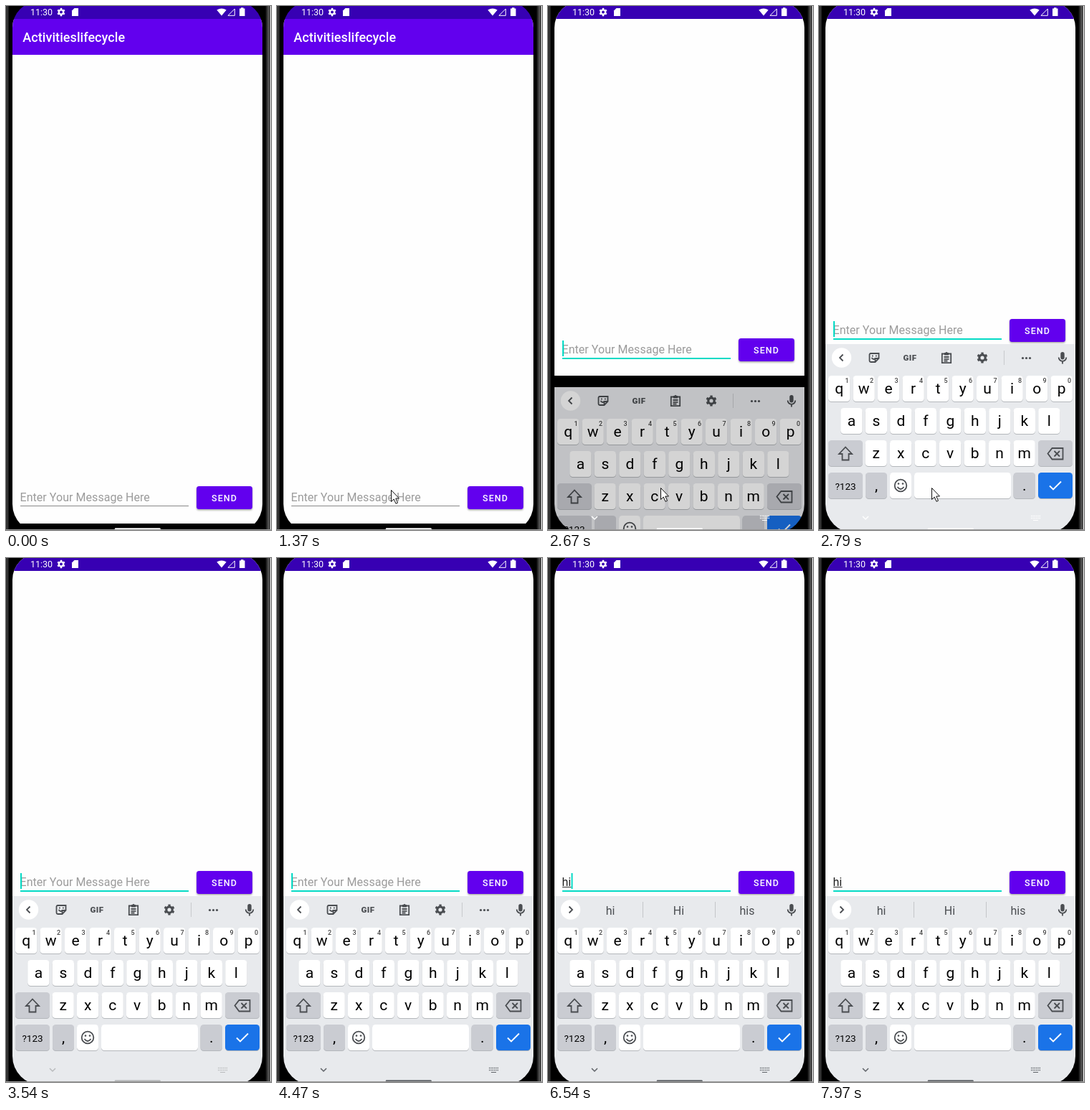
An HTML page for the animation above (8000 ms loop, 370 by 730 pixels).

```html
<!DOCTYPE html>
<html lang="en">
<head>
<meta charset="utf-8">
<title>Message screen</title>
<style>
html, body { margin: 0; width: 100%; height: 100%; overflow: hidden; background: #000 }
svg { display: block; font-family: Roboto, sans-serif }
.line { fill: none; stroke: #4a4d51; stroke-width: 1.8 }
.solid { fill: #4a4d51 }
.mid { text-anchor: middle }
</style>
</head>
<body>
<svg width="370" height="730" viewBox="0 0 370 730">
  <defs>
    <clipPath id="screen"><path d="M9 30A36 36 0 0 1 45 -6H322A36 36 0 0 1 358 30V694A40 40 0 0 1 318 734H49A40 40 0 0 1 9 694Z"/></clipPath>
    <linearGradient id="edgeL"><stop stop-color="#444"/><stop offset=".35" stop-color="#222"/><stop offset=".6" stop-color="#444"/><stop offset="1"/></linearGradient>
    <linearGradient id="edgeR"><stop/><stop offset=".5" stop-color="#444"/><stop offset=".8" stop-color="#555"/><stop offset="1" stop-color="#222"/></linearGradient>
    <filter id="shadow" x="-10%" y="-20%" width="120%" height="150%"><feDropShadow dx="0" dy="1.5" stdDeviation="1.2" flood-opacity=".35"/></filter>
    <g id="gear" fill="none">
      <circle r="4.2" stroke-width="3.2"/>
      <circle r="6.3" stroke-width="2.4" pathLength="12" stroke-dasharray="1 1" transform="rotate(15)"/>
    </g>
  </defs>
  <rect width="370" height="730"/>
  <rect width="4" height="730" fill="url(#edgeL)"/>
  <rect x="362" width="7" height="730" fill="url(#edgeR)"/>
  <rect x="369" width="1" height="730" fill="#fff"/>

  <g clip-path="url(#screen)">
    <g id="app">
      <rect x="9" y="18" width="349" height="703" fill="#fefefe"/>
      <rect x="9" y="18" width="349" height="50" fill="#6200ee"/>
      <text x="23.3" y="50" font-size="18" font-weight="500" letter-spacing=".05" fill="#fff">Activitieslifecycle</text>
      <text id="field" x="19.5" y="689.5" font-size="16" letter-spacing=".05"></text>
      <rect id="spell" x="20" y="691" height="1" fill="#333"/>
      <rect id="underline" x="20" y="696" width="235"/>
      <rect id="caret" y="672" width="2" height="22" fill="#03dac5"/>
      <rect x="266" y="669" width="78" height="32" rx="3.5" fill="#6200ee" filter="url(#shadow)"/>
      <text x="287" y="690" font-size="12.5" font-weight="500" letter-spacing="1.1" fill="#fff">SEND</text>
    </g>

    <rect width="370" height="18" fill="#3700b3"/>
    <g fill="#fff">
      <text x="34" y="13" font-size="12.5">11:30</text>
      <use href="#gear" stroke="#fff" transform="translate(77 8.5) scale(.75)"/>
      <path d="M95.5 3H101V14H92V6.5Z"/>
      <path d="M294.3 5.6Q301 1.2 307.7 5.6L301 13.5Z"/>
      <path d="M319.3 4V13.3H310Z" fill="none" stroke="#fff"/>
      <path d="M326 3.5H328V2.3H331.500V3.5H333.5V14H326Z"/>
    </g>

    <g id="keyboard">
      <rect x="9" y="471" width="349" height="270" fill="#e8eaed"/>
      <circle cx="31.5" cy="490" r="13.7" fill="#fff"/>
      <path id="toggle" class="line"/>
      <g id="tools">
        <path class="line" d="M72 484H83.500V491L78.500 496H72A2 2 0 0 1 70.500 494V485.500A2 2 0 0 1 72 484ZM78.500 496V491H83.500M73.500 490Q75.500 493 78 491.500"/>
        <path class="line" d="M74 487.500h1.600M79 487.500h1.600"/>
        <text class="solid mid" x="127" y="494" font-size="11.5" font-weight="900" letter-spacing=".5">GIF</text>
        <path class="line" d="M171.800 484.500H184.200V497.200H171.800ZM174.500 489H181.500M174.500 491.800H181.500M174.500 494.500H179.500"/>
        <path class="solid" d="M175 483H176.500A1.600 1.600 0 0 1 179.500 483H181V486.500H175Z"/>
        <use href="#gear" stroke="#4a4d51" transform="translate(228 490)"/>
        <path d="M258.500 480V500" stroke="#c8cacd"/>
        <g class="solid"><circle cx="284.500" cy="490.500" r="1.600"/><circle cx="289.500" cy="490.500" r="1.600"/><circle cx="294.500" cy="490.500" r="1.600"/></g>
      </g>
      <g id="suggestions" font-size="16" class="solid mid">
        <text x="87" y="496.500"></text><text x="182.500" y="496.500"></text><text x="278" y="496.500"></text>
        <path d="M132.500 479V501M233.500 479V501" stroke="#c4c6c9"/>
      </g>
      <rect class="solid" x="337.300" y="482" width="5.400" height="10.500" rx="2.700"/>
      <path class="line" d="M334.700 489.500A5.300 5.300 0 0 0 345.300 489.500M340 495V498.500"/>
      <g id="keys"></g>
      <path class="line" d="M37 614.500L46 624H41.500V632.500H32.500V624H28Z"/>
      <path class="line" d="M319.500 623.500L325.500 616H340.500V631.500H325.500ZM328.500 620L336 627.500M336 620L328.500 627.500"/>
      <circle class="line" cx="114" cy="668" r="8.300"/>
      <path class="line" d="M109.500 670Q114 676 118.500 670"/>
      <circle class="solid" cx="111" cy="665.500" r="1.300"/><circle class="solid" cx="117" cy="665.500" r="1.300"/>
      <path d="M322 668.500L327 673.500L338 662.500" fill="none" stroke="#fff" stroke-width="1.900"/>
    </g>

    <g id="nav" fill="none">
      <g id="navIcons">
        <path d="M61 711L65 715L69 711" stroke-width="1.500"/>
        <path d="M296 710.500H309M296 713.500H309" stroke-width="1.400" stroke-dasharray="1.300 1.040"/>
        <path d="M299 716.500H306" stroke-width="1.200"/>
      </g>
      <path d="M153 728.500H214.500" stroke-width="2.500" stroke-linecap="round"/>
    </g>
  </g>
  <rect y="729" width="370" height="1" fill="#999"/>
  <path id="pointer" d="M.5 .5V16.500L4.200 13L7 19.300L9.500 18.200L6.800 12H11.500Z" fill="#fff" stroke="#111"/>
</svg>

<script>
const LOOP = 8000;
const $ = id => document.getElementById(id);
const show = (id, on) => $(id).setAttribute('visibility', on ? 'visible' : 'hidden');
const set = (id, attrs) => { for (const name in attrs) $(id).setAttribute(name, attrs[name]); };
// Last value whose start time has passed
const at = (steps, t) => steps.filter(s => s[0] <= t).pop()[1];

function key(x, y, width, label = '', { fill = '#fff', size = 21, hint = '' } = {}) {
  const box = dy => `<rect x="${x}" y="${y + dy}" width="${width}" height="36" rx="4.5" `;
  $('keys').innerHTML += box(1) + 'fill="#b4b7bb"/>' + box(0) + `fill="${fill}"/>` +
    `<text class="mid" x="${x + width / 2}" y="${y + (size < 20 ? 23.5 : 25)}" font-size="${size}">${label}</text>` +
    `<text class="mid" x="${x + 26}" y="${y + 9.5}" font-size="9" font-weight="500" fill="#444">${hint}</text>`;
}

const grey = { fill: '#caccd2' };
[['qwertyuiop', 13], ['asdfghjkl', 30.2], ['zxcvbnm', 64.5]].forEach(([letters, x], row) =>
  [...letters].forEach((c, i) =>
    key(x + i * 34.5, 515 + row * 45, 30.3, c, { hint: row ? '' : (i + 1) % 10 })));
key(13, 605, 48, '', grey);
key(306, 605, 48, '', grey);
key(13, 650, 48, '?123', { ...grey, size: 13.5 });
key(65, 650, 30, ',', grey);
key(99, 650, 30);
key(133, 650, 135);
key(271.5, 650, 30.5, '.', grey);
key(306, 650, 48, '', { fill: '#1a73e8' });

const pan = [[0, 0], [2670, -206], [2790, -233]];
const pointer = [[0, null], [830, [231, 698]], [960, [203, 693]], [1080, [179, 689]],
  [1370, [159, 674]], [2280, [157, 671]], [3180, null]];
const caretFlips = [2400, 3030, 3420, 3900, 4470, 4900, 5430, 6970, 7490, 7970];
const typed = [[0, ''], [5990, 'h'], [6540, 'hi']];
const words = [[0, []], [6140, ['h', 'H', 'he']], [6540, ['hi', 'Hi', 'his']]];

function draw(t) {
  const focused = t >= 2400, text = at(typed, t), suggestions = at(words, t);
  const textWidth = [0, 9, 12.5][text.length];
  set('app', { transform: `translate(0 ${at(pan, t)})` });
  $('field').textContent = text || 'Enter Your Message Here';
  set('field', { fill: text ? '#222' : '#9b9b9b' });
  set('spell', { width: textWidth });
  set('underline', focused ? { height: 2, fill: '#03dac5' } : { height: 1, fill: '#888' });
  set('caret', { x: 20 + textWidth });
  show('caret', caretFlips.filter(f => f <= t).length % 2);

  const rising = t < 2790;
  show('keyboard', t >= 2670);
  set('keyboard', { opacity: rising ? .83 : 1, transform: `translate(0 ${rising ? 60 : 0})` });
  const suggesting = suggestions.length > 0;
  $('tools').style.display = suggesting ? 'none' : '';
  $('suggestions').style.display = suggesting ? '' : 'none';
  $('suggestions').querySelectorAll('text').forEach((el, i) => el.textContent = suggestions[i] || '');
  set('toggle', { d: suggesting ? 'M29.500 485.500L34 490L29.500 494.500' : 'M33.500 485.500L29 490L33.500 494.500' });

  const tint = Math.min(1, Math.max(0, (t - 3030) / 1170));
  set('nav', { stroke: `rgb(${[95, 99, 104].map(c => Math.round(255 + (c - 255) * tint))})` });
  show('navIcons', t >= 2670);

  const tip = at(pointer, t);
  show('pointer', tip);
  if (tip) set('pointer', { transform: `translate(${tip})` });
}

const start = performance.now();
(function tick() {
  draw((performance.now() - start) % LOOP);
  requestAnimationFrame(tick);
})();
</script>
</body>
</html>
```
